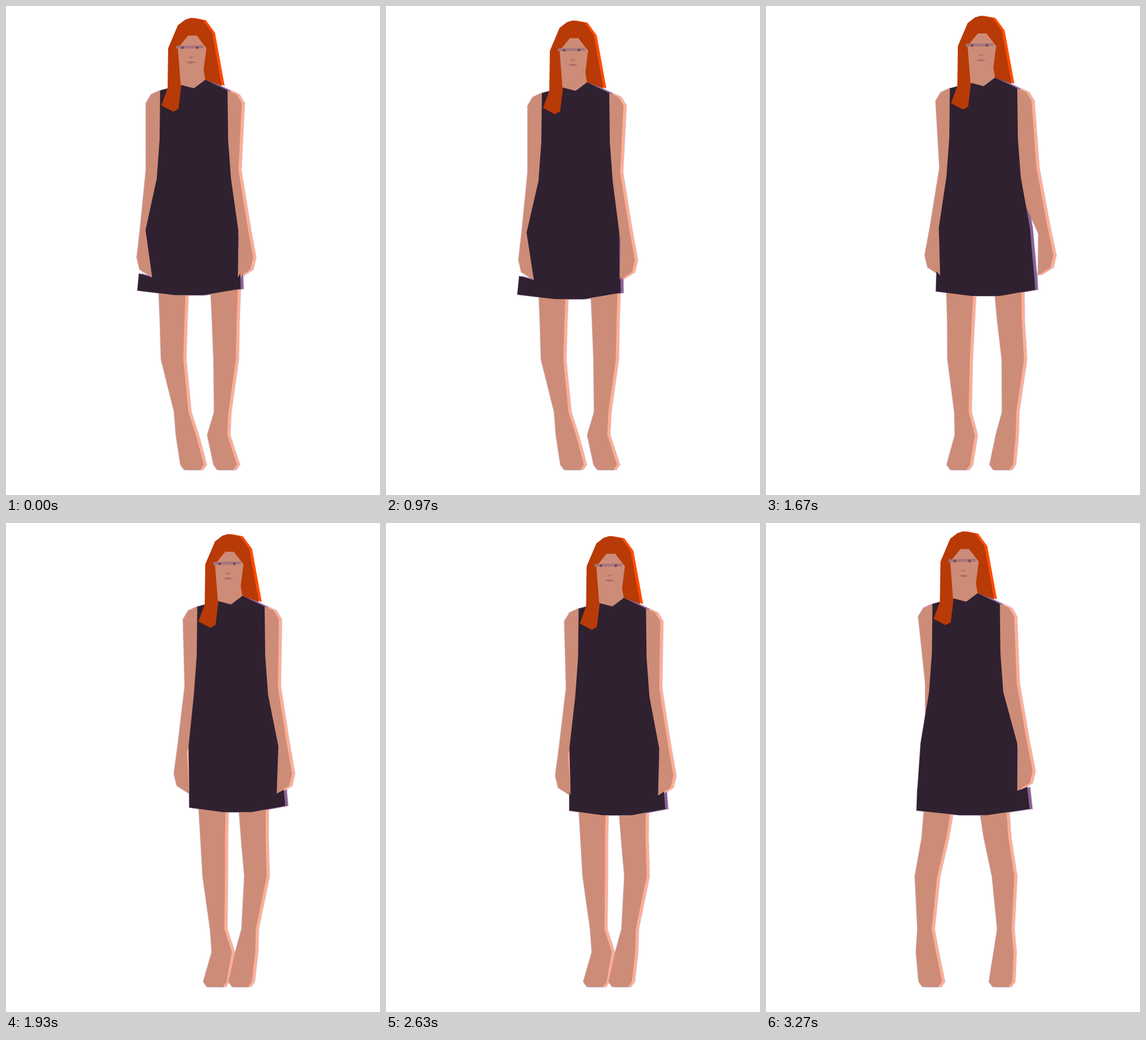
Recreate the animation shown at these times as an HTML page with a canvas. Size 655x855 px, loop 3310 ms.

```html
<!DOCTYPE html>
<html lang="en">
<head>
<meta charset="utf-8">
<title>Side step</title>
<style>
html, body { margin: 0; width: 100%; height: 100%; overflow: hidden; background: #fff; }
canvas { display: block; }
</style>
</head>
<body>
<canvas id="stage" width="655" height="855"></canvas>
<script>
const ctx = document.getElementById('stage').getContext('2d');
const LOOP = 3310, STEP = 33.1, SHIFT = 5;
const SKIN = '#cd8c77', CLOTH = '#2f2130', HAIR = '#b83a06';

// Joints per pose. Arms: reach of elbow and hand from the neck.
// Legs: x of hip, calf, ankle, heel and toe.
const standA = {
  neck: [330.5, 146], hem: [230, 411], armL: [84, 100], armR: [78, 104],
  legL: [291, 291, 307, 315, 326], legR: [382, 383, 377, 370, 384]
};
const stepOut = {
  neck: [359.5, 136.5], hem: [268, 433], armL: [87, 104], armR: [73, 92],
  legL: [318, 308, 315, 317, 327], legR: [405, 418, 419, 416, 412]
};
const closing = {
  neck: [383, 141.5], hem: [299, 473], armL: [77, 103], armR: [93, 123],
  legL: [341, 339, 344, 350, 338], legR: [424, 433, 426, 420, 412]
};
const standB = {
  neck: [395.5, 144.5], hem: [321, 489], armL: [81, 100], armR: [82, 107],
  legL: [361, 364, 370, 378, 366], legR: [431, 437, 425, 419, 410]
};
const stepBack = {
  neck: [347, 136], hem: [260, 460], armL: [71, 70], armR: [89, 117],
  legL: [298, 275, 272, 274, 283], legR: [394, 414, 417, 416, 411]
};
const keys = [
  [0, standA], [1070, standA], [1400, stepOut], [1670, closing],
  [1930, standB], [2800, standB], [3270, stepBack]
];

// Cubic between keys; a held pose has no speed at its ends
function poseAt(t) {
  const last = keys.length - 1;
  t = Math.min(t, keys[last][0]);
  let i = 0;
  while (i < last - 1 && t >= keys[i + 1][0]) i++;
  const [t0, from] = keys[i], [t1, to] = keys[i + 1];
  const span = t1 - t0, u = (t - t0) / span, v = 1 - u;
  const slope = (k, part, n) => {
    const [ta, a] = keys[Math.max(k - 1, 0)], [tb, b] = keys[Math.min(k + 1, last)];
    const held = k < last && (a === keys[k][1] || b === keys[k][1]);
    return held ? 0 : (b[part][n] - a[part][n]) / (tb - ta) * span;
  };
  const pose = {};
  for (const part in from) {
    pose[part] = from[part].map((p, n) =>
      p * (1 + 2 * u) * v * v + slope(i, part, n) * u * v * v +
      to[part][n] * u * u * (3 - 2 * u) - slope(i + 1, part, n) * u * u * v);
  }
  return pose;
}

function trace(pts, dx) {
  ctx.beginPath();
  for (const [x, y] of pts) ctx.lineTo(x + dx, y);
  ctx.closePath();
}

function fill(pts, color, dx = 0) {
  trace(pts, dx);
  ctx.fillStyle = color;
  ctx.fill();
}

function outline(pts, dx) {
  trace(pts, dx);
  ctx.stroke();
}

function leg([hip, calf, ankle, heel, toe]) {
  const thigh = hip + (calf - hip) * 0.35;
  const rows = [
    [hip, 490, 24], [thigh, 550, 21.5], [calf, 618, 19.5], [ankle, 710, 12.5],
    [heel, 750, 17.5], [toe, 802, 20.5], [toe, 811, 14]
  ];
  return [
    ...rows.map(([x, y, w]) => [x - w, y]),
    ...rows.reverse().map(([x, y, w]) => [x + w, y])
  ];
}

// Points below are measured outward (side -1 or 1) and down from the neck
const place = ([nx, ny], side, pts) => pts.map(([x, y]) => [nx + side * x, ny + y]);

function arm(neck, side, [elbow, hand]) {
  const wrist = elbow + (hand - elbow) * 0.65;
  return place(neck, side, [
    [48, 5], [60, 4], [75, 11], [84, 26], [elbow, 143], [wrist, 247],
    [hand, 296], [hand - 5, 317], [hand - 27, 331],
    [wrist - 16, 258], [elbow - 38, 168]
  ]);
}

// One side of the dress; a hand resting on it cuts a notch
function seam(neck, side, hemX, hemY, hand) {
  const hem = (hemX - neck[0]) * side;
  const hip = 45 + hem * 0.4, edge = hip + (hem - hip) * 0.8;
  const tip = hand - 27, depth = edge - tip;
  const inner = depth > 0 && depth < 30 ? tip : edge;
  return place(neck, side, [
    [59, 4], [60, 90], [65, 158], [hip, 248], [inner, 331], [edge, 324],
    [hem, hemY - neck[1]]
  ]);
}

function dressShape({ neck, hem, armL, armR }, drop) {
  const left = seam(neck, -1, hem[0], 501 + drop, armL[1]);
  const right = seam(neck, 1, hem[1], 498 + drop, armR[1]);
  const mid = (hem[0] + hem[1]) / 2;
  return [
    ...place(neck, 1, [[-23, -6], [0, 0], [20, -15]]), ...right,
    [mid + 25, 509 + drop], [mid - 25, 509 + drop], ...left.reverse()
  ];
}

const hairPts = [
  [-28, -110], [-15, -120], [-5, -123], [16, -119], [32, -97], [49, -4], [20, -15],
  [-22, -5], [-27, 36], [-36, 41], [-57, 30], [-46, 0], [-45, -70]
];
const facePts = [
  [-10, -92], [5, -92], [22, -70], [17, -32], [20, -15], [0, 0], [-23, -6], [-28, -70]
];

function drawFace(neck) {
  const part = (color, pts) => fill(place(neck, 1, pts), color);
  part(SKIN, facePts);
  part('#a8747c', [[-31, -74], [17, -75], [17, -70], [-31, -69]]);
  ctx.fillStyle = '#6d4750';
  for (const x of [-20, 6]) {
    ctx.beginPath();
    ctx.arc(neck[0] + x, neck[1] - 71, 2.3, 0, 7);
    ctx.fill();
  }
  part('#ac7069', [[-10, -55], [0, -55], [-5, -52]]);
  part('#a86f6b', [[-14, -45], [-8, -47], [-2, -47], [4, -45], [-5, -43]]);
}

function draw(t) {
  ctx.fillStyle = '#fff';
  ctx.fillRect(0, 0, 655, 855);

  const pose = poseAt(t);
  const breath = -Math.cos(t / 1940 * 2 * Math.PI);
  const { neck } = pose;
  neck[0] += 1.5 * breath;
  neck[1] += 2.2 * breath;

  const skin = [
    leg(pose.legL), leg(pose.legR),
    arm(neck, -1, pose.armL), arm(neck, 1, pose.armR)
  ];
  const dress = dressShape(pose, 3.5 * breath);
  const hair = place(neck, 1, hairPts);

  ctx.strokeStyle = 'rgba(120,80,140,.6)';
  ctx.lineWidth = 1.6;
  ctx.setLineDash([2, 1.5]);
  for (const pts of [...skin, dress]) {
    outline(pts, 0);
    outline(pts, SHIFT);
  }
  ctx.setLineDash([]);

  // Bright copies peek out to the right of the flat shapes
  for (const pts of skin) fill(pts, '#ffae94', SHIFT);
  fill(dress, '#8a6194', SHIFT);
  fill(hair, '#ff4d00', SHIFT);

  for (const pts of skin) fill(pts, SKIN);
  fill(dress, CLOTH);
  fill(hair, HAIR);
  drawFace(neck);
}

const start = performance.now();
function tick() {
  const t = (performance.now() - start) % LOOP;
  draw(Math.floor(t / STEP) * STEP);
  requestAnimationFrame(tick);
}
tick();
</script>
</body>
</html>
```
